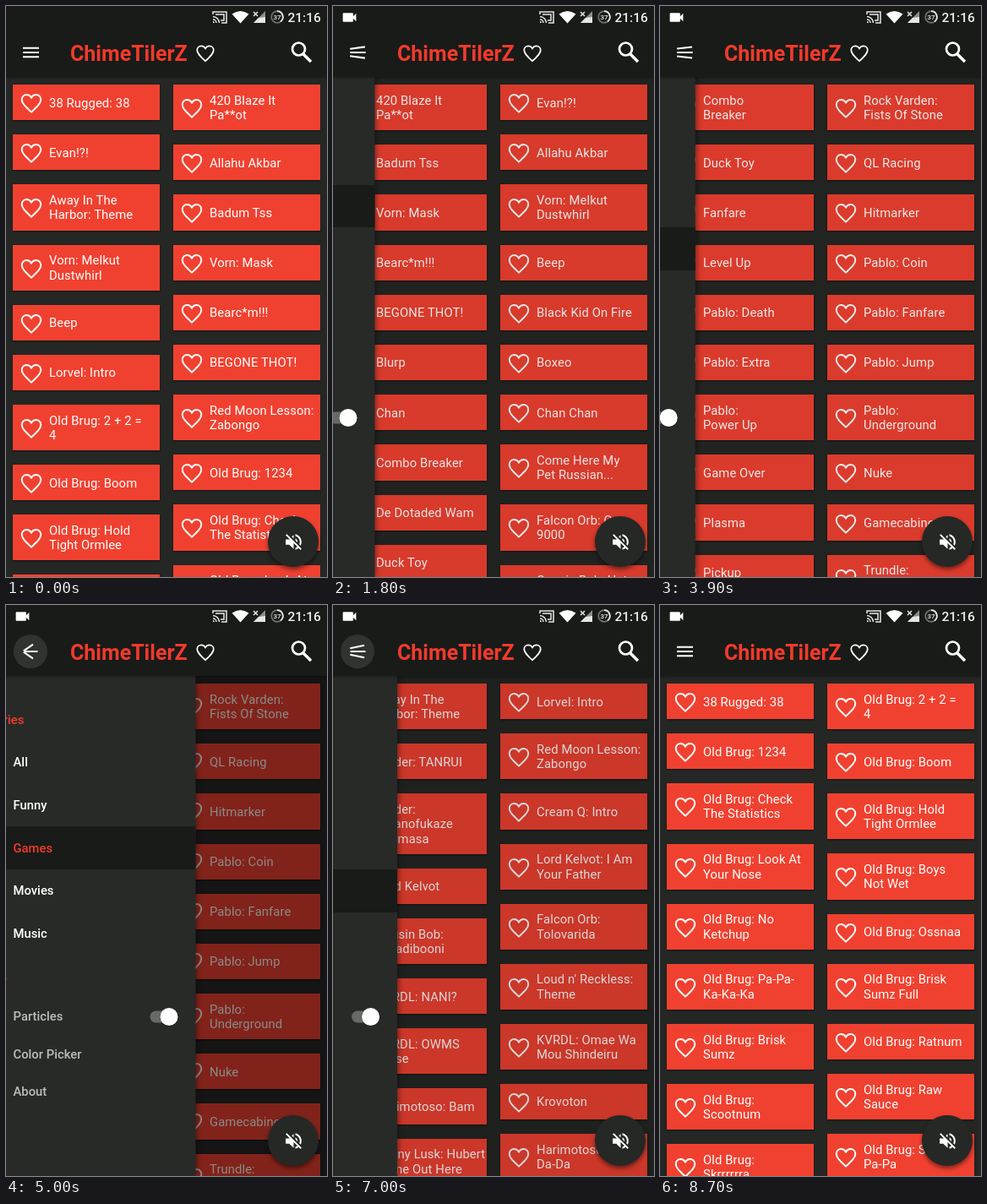
An HTML page that plays this animation: 380 by 676 pixels, repeating every 8.8 s.

```html
<!DOCTYPE html>
<html lang="en">
<head>
<meta charset="utf-8">
<title>Sound board</title>
<style>
html, body { margin: 0; width: 100%; height: 100%; overflow: hidden; background: #252725; }
#stage { position: relative; width: 380px; height: 676px; overflow: hidden; background: #252725;
  font: 14.8px/17.3px Roboto, sans-serif; color: #fff; }
#stage div, #stage svg { position: absolute; }
.fill { left: 0; top: 0; width: 380px; height: 676px; }
.card { width: 174px; background: #f04130; box-shadow: 0 1px 2px #0008; }
.card p { position: absolute; left: 43px; top: 1px; height: 100%; margin: 0; display: flex;
  align-items: center; white-space: pre; letter-spacing: .1px; }
#scrim { background: #000; }
#fab { left: 310px; top: 604px; width: 60px; height: 60px; border-radius: 50%; background: #262826;
  box-shadow: 0 3px 5px #0007; }
#drawer { left: 0; top: 0; width: 292px; height: 676px; background: #282a28; }
#band { left: 0; width: 100%; height: 50.7px; background: #191b19; }
.label { font-weight: 500; white-space: nowrap; transform: translateY(-50%); }
.red { color: #f23a2b; }
.grey { color: #bdbdbd; }
#bar { left: 0; top: 0; width: 380px; height: 84px; background: #191b19; box-shadow: 0 1px 3px #0006; }
#title { left: 76px; top: 57px; font-size: 25px; line-height: 30px; font-weight: 700; }
#ripple { left: 9px; top: 35px; width: 40px; height: 40px; border-radius: 50%; background: #313331; }
#touch { width: 24px; height: 24px; margin: -12px; border-radius: 50%;
  background: radial-gradient(circle closest-side, #c4c4c4, #a9a9a9 65%, #d2d2d2 78%, #8a8a8a 88%, #7776); }
</style>
</head>
<body>
<div id="stage">
  <div id="lists" class="fill"></div>
  <div id="scrim" class="fill"></div>
  <div id="fab"></div>
  <div id="drawer"><div id="band"></div></div>
  <div id="bar">
    <div id="ripple"></div>
    <div id="title" class="label red">ChimeTilerZ</div>
    <svg class="fill" viewBox="0 0 380 676" fill="none" stroke="#fff">
      <path id="menu" stroke-width="2.1"/>
      <circle cx="346.500" cy="51" r="7.500" stroke-width="2.700"/>
      <path d="M352 57L361 66" stroke-width="3.500"/>
      <g stroke="#e6e6e6" stroke-width="1.500">
        <path d="M245 10V7H261V20H255M245 12.500A8 8 0 0 1 252.500 20M245 16A4 4 0 0 1 249 20M248 10H258V17H254"/>
        <path d="M245 20V18A2 2 0 0 1 247 20Z" fill="#e6e6e6" stroke="none"/>
        <path d="M267.500 9.500Q277.500 2.500 287.500 9.500L277.500 20.500Z" fill="#fff" stroke="none"/>
        <path d="M307 6V20H293Z" fill="#8c8e8c" stroke="none"/>
        <path d="M307 13V20H293L299 14Z" fill="#e6e6e6" stroke="none"/>
        <path d="M293 7L298 12M298 7L293 12"/>
        <circle cx="321" cy="13" r="6.800" stroke="#6d6f6d" stroke-width="1.800"/>
        <path d="M321 6.200A6.800 6.800 0 0 1 325 18.500" stroke-width="1.800"/>
      </g>
      <g fill="#eee" stroke="none" font-family="Roboto, sans-serif" font-weight="500">
        <text x="321" y="16" font-size="8" text-anchor="middle">37</text>
        <text x="333.500" y="18.500" font-size="15.500">21:16</text>
      </g>
    </svg>
  </div>
  <div id="touch"></div>
</div>
<script>
const $ = id => document.getElementById(id);
const add = (id, html) => $(id).insertAdjacentHTML('beforeend', html);

const HEART = '<path fill="none" stroke="currentColor" stroke-width="1.6" d="M12 20.500C6 15 3 12 3 8.500C3 6 5 4 7.500 4C9.300 4 11 5 12 6.700C13 5 14.700 4 16.500 4C19 4 21 6 21 8.500C21 12 18 15 12 20.500Z"/>';
const CAMERA = '<path d="M17 10.500V7c0-.55-.45-1-1-1H4c-.55 0-1 .45-1 1v10c0 .55.45 1 1 1h12c.55 0 1-.45 1-1v-3.500l4 4v-11l-4 4z"/>';
const MUTED = '<path d="M16.500 12c0-1.770-1.020-3.290-2.500-4.030v2.210l2.450 2.450c.03-.2.05-.41.05-.63zm2.500 0c0 .94-.2 1.820-.54 2.640l1.510 1.510C20.630 14.910 21 13.500 21 12c0-4.280-2.990-7.860-7-8.770v2.060c2.890.86 5 3.540 5 6.710zM4.270 3L3 4.270 7.730 9H3v6h4l5 5v-6.730l4.250 4.250c-.67.52-1.420.93-2.250 1.180v2.060c1.380-.31 2.630-.95 3.690-1.810L19.730 21 21 19.730l-9-9L4.270 3zM12 4L9.910 6.090 12 8.180V4z"/>';
const STAR = '<path stroke="currentColor" stroke-width="5" d="M12 1V23M2.500 6.500L21.500 17.500M21.500 6.500L2.500 17.500"/>';
const SMILE = '<g fill="none" stroke="currentColor" stroke-width="1.900"><circle cx="12" cy="12" r="10.600"/><path d="M6.500 14a5.800 5.800 0 0 0 11 0"/></g><circle cx="8.300" cy="9" r="1.700"/><circle cx="15.700" cy="9" r="1.700"/>';
const PAD = '<path d="M6.500 5.500H17.500A6.500 6.500 0 1 1 15 17Q12 15 9 17A6.500 6.500 0 1 1 6.500 5.500Z"/><path stroke="#282a28" stroke-width="1.700" d="M3.500 12H9.500M6.500 9V15"/><g fill="#282a28"><circle cx="15.500" cy="13.500" r="1.500"/><circle cx="19" cy="10.500" r="1.500"/></g>';
const NOTE = '<path d="M7 4L23 .5V17a4 3.400 0 1 1-2.500-3V6.500L9.500 9V20a4 3.400 0 1 1-2.500-3Z"/>';
const WAND = '<path stroke="currentColor" stroke-width="3.600" d="M3 21L17 7"/><path stroke="currentColor" stroke-width="1.500" d="M6 3V8M3.500 5.500H8.500M20 12V16M18 14H22M12 2V5M10.500 3.500H13.500M20 2V5M18.500 3.500H21.500"/>';
const BRUSH = '<path d="M22.500 1.500Q24 3 22.500 5L14 14.500L10 10.500L19.500 2Q21 .5 22.500 1.500ZM9 12L12.500 15.500Q12 22 2 21.500Q5 20 5 16Q5.500 12.500 9 12Z"/>';
const BOOK = '<path d="M7.500 2H22L17.500 18H5Q4 20 6 20H18L22 7L23 8L19 22H5Q1 21 2.500 17L6 4Q6.500 2 7.500 2Z"/><path stroke="#282a28" stroke-width="1.400" d="M9.500 6H18M8.500 9.500H17"/>';

const icon = (x, y, size, art, attrs = '') =>
  `<svg ${attrs} viewBox="0 0 24 24" fill="currentColor" style="left:${x - size / 2}px;top:${y - size / 2}px;width:${size}px;height:${size}px">${art}</svg>`;
const label = (x, y, text, cls = '') => `<div class="label ${cls}" style="left:${x}px;top:${y + 1}px">${text}</div>`;

// Items are separated by ";" and lines by "|".
const CLIPS = [
  '38 Rugged: 38;420 Blaze It|Pa**ot;Evan!?!;Allahu Akbar;Away In The|Harbor: Theme;Badum Tss;Vorn: Melkut|Dustwhirl;Vorn: Mask;Bearc*m!!!;Beep;BEGONE THOT!;Lorvel: Intro;Red Moon Lesson:|Zabongo;Old Brug: 2 + 2 =|4;Old Brug: 1234;Old Brug: Boom;Old Brug: Check|The Statistics;Old Brug: Hold|Tight Ormlee;Old Brug: Look At|Your Nose;Old Brug: Boys|Not Wet',
  '420 Blaze It|Pa**ot;Evan!?!;Allahu Akbar;Badum Tss;Vorn: Melkut|Dustwhirl;Vorn: Mask;Bearc*m!!!;Beep;BEGONE THOT!;Black Kid On Fire;Blurp;Boxeo;Chan;Chan Chan;Combo Breaker;Come Here My|Pet Russian...;De Dotaded Wam;Falcon Orb: Over|9000;Duck Toy;Cousin Bob: Hat|Laugh',
  'Combo|Breaker;Rock Varden:|Fists Of Stone;Duck Toy;QL Racing;Fanfare;Hitmarker;Level Up;Pablo: Coin;Pablo: Death;Pablo: Fanfare;Pablo: Extra;Pablo: Jump;Pablo:|Power Up;Pablo:|Underground;Game Over;Nuke;Plasma;Gamecabinet;Pickup;Trundle:|Battle',
  'Away In The|Harbor: Theme;Lorvel: Intro;Red Moon Lesson:|Zabongo;Cinder: TANRUI;Cinder:|Miranofukaze|Torimasa;Cream Q: Intro;Lord Kelvot: I Am|Your Father;Lord Kelvot;Falcon Orb:|Tolovarida;Cousin Bob:|Doradibooni;Loud n\' Reckless:|Theme;KVRDL: NANI?;KVRDL: Omae Wa|Mou Shindeiru;KVRDL: OWMS|Noise;Krovoton;Harimotoso: Bam;Harimotoso:|Da-Da;Benny Lusk: Hubert|Come Out Here',
  '38 Rugged: 38;Old Brug: 2 + 2 =|4;Old Brug: 1234;Old Brug: Boom;Old Brug: Check|The Statistics;Old Brug: Hold|Tight Ormlee;Old Brug: Look At|Your Nose;Old Brug: Boys|Not Wet;Old Brug: No|Ketchup;Old Brug: Ossnaa;Old Brug: Pa-Pa-|Ka-Ka-Ka;Old Brug: Brisk|Sumz Full;Old Brug: Brisk|Sumz;Old Brug: Ratnum;Old Brug: Raw|Sauce;Old Brug:|Scootnum;Old Brug: Skidi|Pa-Pa;Old Brug:|Skrrrrrra'
];
const HEIGHTS = [0, 42.3, 54.2, 71.5];

// Each card goes to the shorter column, the left one on a tie.
function buildList(items) {
  const bottom = [93, 93];
  const cards = items.split(';').map(item => {
    const lines = item.split('|'), h = HEIGHTS[lines.length];
    const col = bottom[1] < bottom[0] - 1 ? 1 : 0, y = bottom[col];
    bottom[col] += h + 16.9;
    return `<div class="card" style="left:${8 + col * 190}px;top:${y}px;height:${h}px">` +
      icon(21.5, h / 2 + 1, 30, HEART) + `<p>${lines.join('\n')}</p></div>`;
  });
  add('lists', `<div class="fill">${cards.join('')}</div>`);
}
CLIPS.forEach(buildList);

const rowY = i => 186.3 + i * 50.7;
const ROWS = [['All', STAR, 25], ['Funny', SMILE, 25], ['Games', PAD, 24], ['Movies', CAMERA, 32], ['Music', NOTE, 24]];
const OPTIONS = [['Particles', WAND, 487], ['Color Picker', BRUSH, 532], ['About', BOOK, 576]];

add('drawer', label(17, 136, 'Categories', 'red') + label(17, 440, 'Options', 'red'));
ROWS.forEach(([name, art, size], i) => add('drawer',
  `<div class="row">${icon(29.5, rowY(i), size, art)}${label(76, rowY(i), name)}</div>`));
OPTIONS.forEach(([name, art, y]) => add('drawer',
  `<div class="grey">${icon(27, y, 19, art)}${label(76, y, name)}</div>`));
add('drawer', '<svg class="fill" viewBox="0 0 380 676"><rect x="238" y="480.500" width="30" height="14" rx="7" fill="#686a68"/><circle cx="260.500" cy="488" r="11" fill="#0004"/><circle cx="260.500" cy="487.500" r="10.500" fill="#fff"/></svg>');
add('bar', icon(236, 55.5, 26, HEART) + icon(19, 13, 21, CAMERA, 'id="rec"'));
add('fab', icon(30, 30.5, 25, MUTED));

const lists = [...$('lists').children], rows = [...document.querySelectorAll('.row')];
const OPENS = [600, 2700, 4800, 6900], CLOSES = [1400, 3500, 5600, 8000], DELAYS = [247, 235, 221, 235];
const RIPPLE = [.5, 1, 1, .6, .25];
const lerp = (a, b, p) => a + (b - a) * p;
const ease = ms => 1 - (1 - Math.min(1, Math.max(0, ms / 512))) ** 5;

// Three bars that fold into a left arrow.
function menuPath(p) {
  const u = 1.056, head = lerp(18, 11.3, p) * u, shaft = lerp(18, 16, p) * u;
  const turn = p * Math.PI / 4, dx = head * Math.cos(turn), dy = head * Math.sin(turn);
  const gap = lerp(5, -.7, p) * u, x = 29.5 - shaft / 2, y = 55;
  return `M${x + p},${y}h${shaft - 2 * p}M${x},${y + gap}l${dx},${dy}M${x},${y - gap}l${dx},${-dy}`;
}

function draw(now) {
  const t = Math.floor(now % 8800 / 100) * 100;
  let slide = 0, category = 0, ripple = 0, touch = null;
  OPENS.forEach((open, i) => {
    const a = t - open, b = t - CLOSES[i];
    if (a < 0) return;
    slide = ease(a - 70) - ease(b - DELAYS[i]);
    ripple = RIPPLE[a / 100] || 0;
    if (a < 100) touch = [30, 55];
    if (b >= 0 && b < 200) touch = [130, rowY(i + 1) - 4];
    if (b >= 200) category = i + 1;
  });
  lists.forEach((el, i) => el.style.display = i === category ? '' : 'none');
  rows.forEach((el, i) => {
    el.style.color = i === category ? '#f23a2b' : '#fff';
    el.firstChild.style.color = i === category ? '#f23a2b' : '#bdbdbd';
  });
  $('band').style.top = rowY(category) - 25.3 + 'px';
  $('drawer').style.transform = `translateX(${(slide - 1) * 292}px)`;
  $('drawer').style.boxShadow = slide > .001 ? '2px 0 6px #0006' : 'none';
  $('scrim').style.opacity = slide * .6;
  $('menu').setAttribute('d', menuPath(slide));
  $('ripple').style.opacity = ripple;
  $('rec').style.display = t < 100 ? 'none' : '';
  $('touch').style.display = touch ? '' : 'none';
  if (touch) {
    $('touch').style.left = touch[0] + 'px';
    $('touch').style.top = touch[1] + 'px';
  }
}

const start = performance.now();
function tick() {
  draw(performance.now() - start);
  requestAnimationFrame(tick);
}
tick();
</script>
</body>
</html>
```
